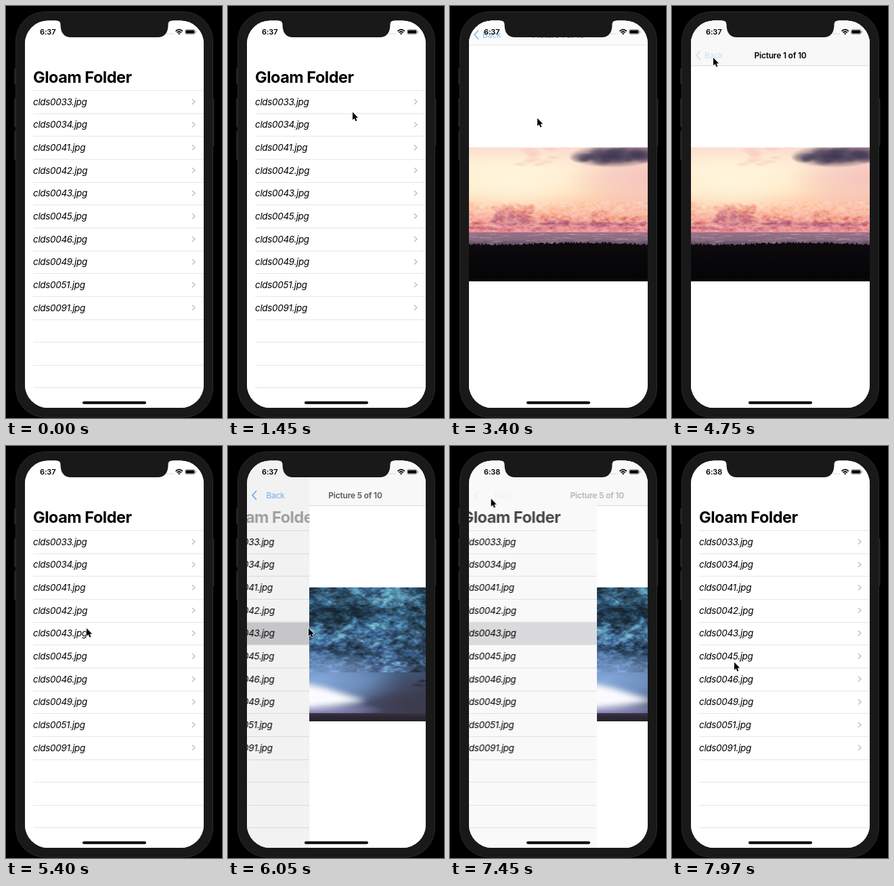
An HTML page with a canvas for the animation above (8 s loop, 319x606 px).

```html
<!DOCTYPE html>
<html lang="en">
<head>
<meta charset="utf-8">
<title>Photo list</title>
<style>
html, body { margin: 0; width: 100%; height: 100%; overflow: hidden; background: #000; }
body { position: relative; font-family: Inter, Roboto, sans-serif; }
svg, .screen { position: absolute; left: 0; top: 0; width: 319px; height: 606px; }
.screen { clip-path: inset(21.5px 27px 15px 28px round 34px); background: #fff; }
#detail { position: absolute; left: 28px; top: 21px; width: 264px; height: 570px; background: #fff; }
canvas { position: absolute; left: 0; top: 187px; }
.big { font-size: 23.5px; font-weight: 700; letter-spacing: -.5px; }
.row { font-size: 13.5px; font-style: italic; letter-spacing: -.33px; }
.name { font-size: 12px; font-weight: 600; letter-spacing: -.2px; text-anchor: middle; }
.link { font-size: 12px; letter-spacing: -.2px; fill: #2583e8; }
.clock { font-size: 11px; font-weight: 600; letter-spacing: -.1px; }
</style>
</head>
<body>
<svg viewBox="0 0 319 606">
  <g fill="#222">
    <rect x="12" y="92" width="4" height="23" rx="1"/>
    <rect x="12" y="136" width="4" height="42" rx="1"/>
    <rect x="12" y="184" width="4" height="42" rx="1"/>
    <rect x="303" y="136" width="4.5" height="70" rx="1"/>
  </g>
  <rect x="14.5" y="8.5" width="291" height="596.5" rx="43" fill="#191919" stroke="#292929"/>
</svg>

<div class="screen">
  <svg id="list" viewBox="0 0 319 606">
    <rect x="28" y="21" width="264" height="570" fill="#fff"/>
    <g id="rows"></g>
    <text id="big" class="big" x="40" y="113">Gloam Folder</text>
    <rect id="dim" x="28" y="21" width="264" height="570"/>
  </svg>
  <div id="detail">
    <canvas id="dusk" width="264" height="197"></canvas>
    <canvas id="storm" width="264" height="197"></canvas>
  </div>
  <svg id="nav" viewBox="0 0 319 606">
    <g id="bar">
      <rect x="28" y="21" width="264" height="67" fill="#f8f8f8"/>
      <rect x="28" y="87.5" width="264" height=".8" fill="#cfcfcf"/>
    </g>
    <g id="press">
      <path id="arrow" d="M41.5 66.5L36 72.5L41.5 78.5" fill="none" stroke="#2583e8" stroke-width="1.8" stroke-linecap="round" stroke-linejoin="round"/>
      <text id="back" class="link" x="48" y="76.8">Back</text>
    </g>
    <g id="name">
      <text id="first" class="name" x="160" y="76.8">Picture 1 of 10</text>
      <text id="fifth" class="name" x="160" y="76.8">Picture 5 of 10</text>
    </g>
  </svg>
</div>

<svg viewBox="0 0 319 606">
  <path d="M74 20V21.5C78.5 21.5 80.5 23.5 80.5 27.5C80.5 39 85.5 46 96 46H224C234.5 46 239.5 39 239.5 27.5C239.5 23.5 241.5 21.5 246 21.5V20Z" fill="#191919"/>
  <text id="early" class="clock" x="50" y="42">6:37</text>
  <text id="late" class="clock" x="50" y="42">6:38</text>
  <path d="M238.5 41H248" stroke="#bbb" stroke-width="1.5" stroke-linecap="round" stroke-dasharray="0 2.8"/>
  <g fill="none" stroke="#000" stroke-width="1.7">
    <path d="M250.6 37Q255.7 32.4 260.8 37"/>
    <path d="M252.5 39.2Q255.7 36.3 258.9 39.2"/>
  </g>
  <path d="M254 40.4Q255.7 39 257.4 40.4L255.7 42.2Z"/>
  <rect x="264.4" y="34.4" width="15" height="7.2" rx="2.2" fill="none" stroke="#999" stroke-width=".8"/>
  <rect x="265.4" y="35.4" width="13" height="5.2" rx="1.3"/>
  <rect x="280.2" y="36.6" width="1" height="2.8" rx=".5" fill="#999"/>
  <rect x="113" y="581.5" width="94" height="4" rx="2"/>
  <path id="cursor" d="M0 0V11.6L2.6 9.2L4.5 13.4L6.4 12.6L4.6 8.4H8.2Z" stroke="#fff" stroke-width="1.2" paint-order="stroke" stroke-linejoin="round"/>
</svg>

<script>
const LOOP = 8000;
const PUSH = 'cubic-bezier(.2,.75,.3,1)';
const $ = id => document.getElementById(id);

// List rows
const PITCH = 33.65;
const files = ['0033', '0034', '0041', '0042', '0043', '0045', '0046', '0049', '0051', '0091'];
let rows = '';
for (let i = 0; i < 14; i++) {
  const y = 124 + i * PITCH, mid = y + PITCH / 2;
  if (files[i]) rows += `
    <rect id="hit${i + 1}" x="28" y="${y}" width="264" height="${PITCH}" fill="#d1d1d4" opacity="0"/>
    <text class="row" x="40" y="${mid + 5}">clds${files[i]}.jpg</text>
    <path d="M275 ${mid - 3.8}L279 ${mid}L275 ${mid + 3.8}" fill="none" stroke="#c2c2c5" stroke-width="1.5"/>`;
  rows += `<rect x="40" y="${Math.round(y)}" width="252" height="1" fill="#e6e6e7"/>`;
}
$('rows').innerHTML = rows;

// Pictures
let seed = 11;
const rnd = (a, b) => a + (b - a) * ((seed = seed * 16807 % 2147483647) / 2147483647);

function painter(id) {
  const c = $(id).getContext('2d');
  const fade = (y0, y1, stops) => {
    const g = c.createLinearGradient(0, y0, 0, y1);
    stops.forEach((s, i) => g.addColorStop(i / (stops.length - 1), s));
    c.fillStyle = g;
    c.fillRect(0, y0, 264, y1 - y0);
  };
  const blob = (x, y, rx, ry, rgb, a) => {
    const g = c.createRadialGradient(0, 0, 0, 0, 0, rx);
    g.addColorStop(0, `rgba(${rgb},${a})`);
    g.addColorStop(.5, `rgba(${rgb},${a * .65})`);
    g.addColorStop(1, `rgba(${rgb},0)`);
    c.save();
    c.translate(x, y);
    c.scale(1, ry / rx);
    c.fillStyle = g;
    c.fillRect(-rx, -rx, 2 * rx, 2 * rx);
    c.restore();
  };
  const puffs = (n, x0, x1, y0, y1, r, flat, rgb, a) => {
    while (n--) {
      const k = rnd(r * .5, r);
      blob(rnd(x0, x1), rnd(y0, y1), k, k * flat, rgb, a);
    }
  };
  // Smooth random texture, cells get finer with each pass
  const grain = (y0, y1, cell, a) => {
    for (; cell > 2; cell /= 1.8) {
      const t = document.createElement('canvas');
      t.width = Math.ceil(264 / cell);
      t.height = Math.ceil((y1 - y0) / cell * 1.7);
      const tc = t.getContext('2d');
      for (let i = 0; i < t.width * t.height; i++) {
        const v = rnd(0, 255);
        tc.fillStyle = `rgb(${v},${v},${v})`;
        tc.fillRect(i % t.width, Math.floor(i / t.width), 1, 1);
      }
      c.save();
      c.globalCompositeOperation = 'overlay';
      c.globalAlpha = a;
      c.imageSmoothingQuality = 'high';
      c.drawImage(t, 0, y0, 264, y1 - y0);
      c.restore();
    }
  };
  return { c, fade, blob, puffs, grain };
}

function paintDusk() {
  const { c, fade, blob, puffs, grain } = painter('dusk');
  fade(0, 126, ['#fbdccf', '#ffebd0', '#ffe2bd', '#fcbfa4', '#e68e96']);
  blob(60, 48, 130, 52, '255,247,222', .9);
  blob(264, 45, 120, 60, '240,178,184', .65);
  puffs(10, 60, 135, 2, 34, 20, .3, '243,185,175', .4);
  // dark bank, upper right
  blob(212, 13, 66, 17, '58,50,78', 1);
  blob(256, 6, 50, 17, '96,74,102', .8);
  puffs(18, 165, 264, 4, 21, 18, .5, '62,54,82', .5);
  // heaped clouds: left, right, top
  [[36, 54, 84], [60, 94, 84], [108, 148, 98], [180, 200, 92], [176, 258, 101]].forEach(([a, b, top]) => {
    const n = Math.round((b - a) / 2) + 8;
    puffs(n, a, b, top + 4, 110, 9, .8, '226,132,130', .6);
    puffs(n, a, b, top + 11, 114, 8, .6, '178,98,122', .45);
    puffs(n, a, b, top, top + 9, 5, .8, '250,180,150', .6);
  });
  puffs(60, 0, 264, 111, 121, 14, .3, '188,98,124', .45);
  puffs(24, 0, 264, 108, 119, 10, .25, '246,168,158', .5);
  grain(80, 124, 7, .16);
  fade(125, 146, ['#9a7086', '#856a80', '#44374b']);
  for (let i = 0; i < 130; i++) {
    c.fillStyle = `rgba(235,190,195,${rnd(.08, .4)})`;
    c.fillRect(rnd(-10, 264), rnd(126, 142), rnd(4, 18), .8);
  }
  // shore and grass
  fade(146, 197, ['#0d0a0e', '#070608', '#050406']);
  c.fillStyle = '#0d0a0e';
  for (let x = 0; x < 264; x += 2) {
    const h = 143 - 3 * Math.sin(Math.max(0, x - 70) / 62) + rnd(-1.5, 1.5);
    c.fillRect(x, h, 2.2, 150 - h);
  }
}

function paintStorm() {
  const { c, fade, blob, puffs, grain } = painter('storm');
  fade(0, 197, ['#29465b', '#2c4d66', '#38587a', '#4a6085', '#50506a']);
  puffs(22, 0, 264, 0, 45, 38, .4, '18,36,52', .4);
  blob(115, 12, 62, 20, '105,168,205', .6);
  blob(45, 66, 65, 15, '96,152,192', .5);
  puffs(18, 20, 190, 15, 75, 26, .3, '100,158,195', .3);
  puffs(60, 70, 220, 55, 115, 8, .45, '125,168,198', .3);
  grain(0, 125, 32, .34);
  blob(12, 135, 130, 44, '138,176,228', .9);
  puffs(40, 70, 225, 75, 122, 9, .45, '40,56,82', .35);
  blob(262, 75, 90, 115, '56,53,68', .8);
  blob(215, 165, 140, 55, '57,53,68', 1);
  blob(150, 176, 80, 26, '60,57,76', .8);
  puffs(8, 150, 195, 134, 145, 9, .4, '42,42,58', .6);
  // light under the cloud edge
  blob(20, 180, 90, 11, '150,146,200', .9);
  c.filter = 'blur(5px)';
  c.fillStyle = '#fbfbff';
  c.beginPath();
  [[-20, 138], [22, 147], [84, 167], [40, 174], [-20, 180]].forEach(p => c.lineTo(...p));
  c.fill();
  c.filter = 'none';
  fade(185, 197, ['#3a3444', '#2b2631', '#29242e']);
}

paintDusk();
paintStorm();

// Motion: steps are [ms, properties, easing towards the next step]
function move(el, steps) {
  const frames = [[0, steps[0][1]], ...steps, [LOOP, steps[steps.length - 1][1]]];
  el.animate(
    frames.map(([t, props, easing = 'linear']) => ({ ...props, easing, offset: t / LOOP })),
    { duration: LOOP, iterations: Infinity }
  ).startTime = 0;
}
const at = (x, y) => ({ transform: `translate(${x}px,${y}px)` });
const show = o => ({ opacity: o });

// Two visits to the detail page
const visits = [[1820, 4940], [5940, 7320]];
const visit = (el, away, here) => move(el, visits.flatMap(([go, home]) => [
  [go, away, PUSH], [go + 500, here], [home, here, PUSH], [home + 500, away]
]));
visit($('list'), at(0, 0), at(-79, 0));
visit($('dim'), show(0), show(.08));
visit($('big'), show(1), show(0));
visit($('detail'), at(264, 0), at(0, 0));
visit($('bar'), at(264, 0), at(0, 0));
visit($('name'), { ...at(80, 0), opacity: 0 }, { ...at(0, 0), opacity: 1 });
visit($('arrow'), show(0), show(1));
visit($('back'), { ...at(24, 0), opacity: 0 }, { ...at(0, 0), opacity: 1 });

const swap = (a, b, t) => {
  move(a, [[0, show(1), 'step-end'], [t, show(0)]]);
  move(b, [[0, show(0), 'step-end'], [t, show(1)]]);
};
swap($('dusk'), $('storm'), 5600);
swap($('first'), $('fifth'), 5600);
swap($('early'), $('late'), 7350);

const select = (n, on, off) => move($('hit' + n), [
  [0, show(0), 'step-end'], [on, show(1)], [off, show(1)], [off + 400, show(0)]
]);
select(1, 1650, 4950);
select(5, 5700, 7330);

move($('press'), [
  [4690, show(1)], [4740, show(.2)], [5450, show(.2), 'step-end'], [5500, show(1)],
  [7150, show(1)], [7200, show(.2)], [7850, show(.2), 'step-end'], [7900, show(1)]
]);

// A tap on the picture hides the bar, the next brings it back
const shown = { ...at(0, 0), opacity: 1 }, hidden = { ...at(0, -68), opacity: 0 };
move($('nav'), [
  [3270, shown, 'ease-in-out'], [3550, hidden],
  [3970, hidden, 'ease-in-out'], [4230, shown]
]);

move($('cursor'), [
  [0, { ...at(264, 443), opacity: 0 }, 'step-end'],
  ...[
    [250, 264, 443, 'step-end'], [450, 262, 438, 'step-end'], [600, 248, 385, 'step-end'],
    [780, 248, 385, 'ease-in'], [1000, 196, 220], [1180, 138, 112, 'ease-out'],
    [1260, 130, 104, 'ease-in-out'], [1450, 184, 156], [1600, 184, 153],
    [2620, 184, 153, 'ease-in-out'], [2800, 129, 165],
    [4250, 129, 165, 'ease-in-out'], [4650, 61, 76],
    [5000, 61, 76, 'ease-in-out'], [5380, 119, 268],
    [6150, 119, 268, 'ease-in-out'], [6580, 71.5, 87],
    [6800, 71.5, 87, 'ease-in-out'], [7000, 60, 73],
    [7400, 60, 73, 'ease-in-out'], [7930, 92, 318]
  ].map(([t, x, y, e]) => [t, { ...at(x, y), opacity: 1 }, e])
]);
</script>
</body>
</html>
```
